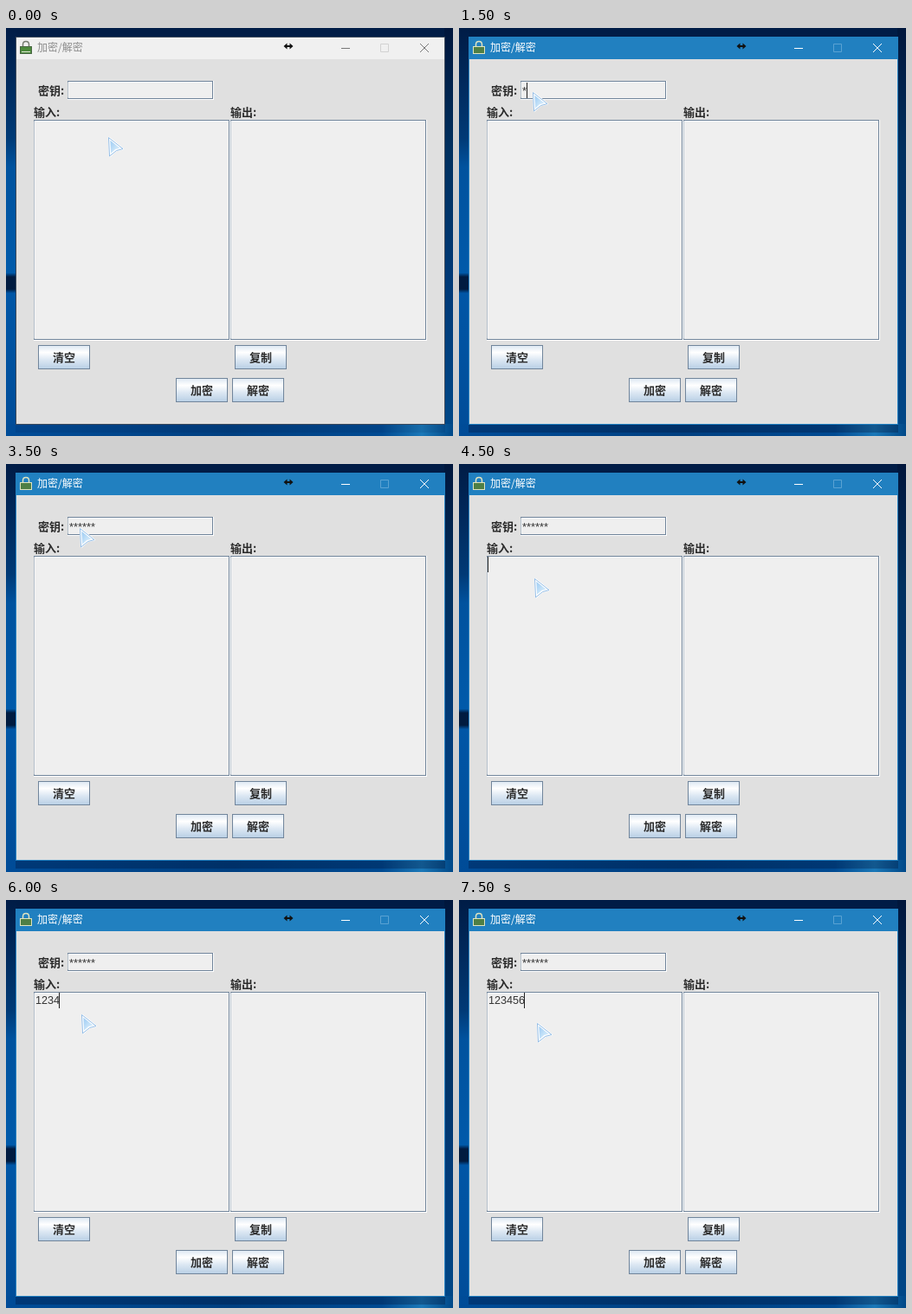
These frames come from a looping animation (516x471 px, 8 s). An HTML page:

```html
<!DOCTYPE html>
<html lang="zh">
<head>
<meta charset="utf-8">
<style>
html, body { margin: 0; width: 516px; height: 471px; overflow: hidden; }
svg { display: block; }
text { font: 12px "Noto Sans CJK SC", "Noto Sans CJK", sans-serif; white-space: pre; }
.label { font-size: 13px; font-weight: bold; fill: #2b2b2b; }
.typed { font: 12.6px "Liberation Sans", Arial, sans-serif; fill: #333; }
.line { fill: none; stroke-width: 1; }
</style>
</head>
<body>
<svg width="516" height="471" viewBox="0 0 516 471">
  <defs>
    <linearGradient id="left" x2="0" y2="1">
      <stop offset="0" stop-color="#001c46"/>
      <stop offset=".12" stop-color="#00285a"/>
      <stop offset=".27" stop-color="#003a76"/>
      <stop offset=".34" stop-color="#00529e"/>
      <stop offset=".6" stop-color="#005aaa"/>
      <stop offset=".61" stop-color="#001b40"/>
      <stop offset=".64" stop-color="#001b40"/>
      <stop offset=".65" stop-color="#0056a6"/>
      <stop offset="1" stop-color="#004c98"/>
    </linearGradient>
    <linearGradient id="right" x2="0" y2="1">
      <stop offset="0" stop-color="#00163c"/>
      <stop offset=".3" stop-color="#00305f"/>
      <stop offset=".65" stop-color="#003a78"/>
      <stop offset="1" stop-color="#004888"/>
    </linearGradient>
    <linearGradient id="floor">
      <stop offset="0" stop-color="#004c98"/>
      <stop offset=".5" stop-color="#003f80"/>
      <stop offset=".84" stop-color="#004a92"/>
      <stop offset=".93" stop-color="#1a78b8"/>
      <stop offset="1" stop-color="#004888"/>
    </linearGradient>
    <linearGradient id="metal" x2="0" y2="1">
      <stop offset="0" stop-color="#dde8f3"/>
      <stop offset=".3" stop-color="#fff"/>
      <stop offset=".6" stop-color="#dde8f3"/>
      <stop offset="1" stop-color="#b8cfe5"/>
    </linearGradient>
    <linearGradient id="ice" x2="1" y2="1">
      <stop offset="0" stop-color="#8fc4f2"/>
      <stop offset=".5" stop-color="#c5e2f8"/>
      <stop offset="1" stop-color="#eef8ff"/>
    </linearGradient>
  </defs>

  <rect width="516" height="471" fill="#001c46"/>
  <rect width="12" height="471" fill="url(#left)"/>
  <rect x="506" width="10" height="471" fill="url(#right)"/>
  <rect y="457" width="516" height="14" fill="url(#floor)"/>
  <rect id="shadow" x="11" y="458" width="496" height="9" fill="#001030" opacity=".3"/>

  <rect id="frame" x="11" y="10" width="496" height="448"/>
  <rect id="bar" x="12" y="11" width="494" height="25"/>
  <rect x="12" y="36" width="494" height="421" fill="#e0e0e0"/>

  <path id="shackle" class="line" d="M19.5 22V19Q19.5 15.5 23 15.5T26.5 19V22" style="stroke-width:1.5"/>
  <rect id="lock" x="16.5" y="21.5" width="13" height="8"/>
  <path id="stripe" class="line" d="M18 27.5H28" stroke="#dfe8d5"/>
  <text id="title" x="36" y="27">加密/解密</text>
  <path d="M320.500 21l4-3.500v2.500h3v-2.500l4 3.500-4 3.500v-2.500h-3v2.500z" fill="#111"/>
  <path id="max" class="line" d="M432.500 18.500h9v9h-9z"/>
  <path id="marks" class="line" d="M387 23.500h10M478 18l10 10m0-10l-10 10"/>

  <g id="form"></g>
  <text id="key" class="typed" x="73" y="77" style="font-size:12.85px"></text>
  <text id="input" class="typed" x="34" y="120"></text>
  <rect id="caret" width="1" height="18" fill="#222"/>
  <g id="mouse">
    <path d="M1 1L16.500 13.500L9 15L2 21.500Z" fill="url(#ice)" stroke="#fff" stroke-width="2.500" stroke-linejoin="round"/>
    <path d="M.5 .5L17 13.500L9.500 15.500L1.500 22Z" fill="none" stroke="#86b5e2" stroke-width=".9" stroke-linejoin="round"/>
  </g>
</svg>
<script>
const $ = id => document.getElementById(id);
const paint = (id, attrs) => {
  for (const name in attrs) $(id).setAttribute(name, attrs[name]);
};

const label = (x, y, text) => `<text class="label" x="${x}" y="${y}">${text}</text>`;
const box = (x, y, w, h) => `
  <rect x="${x}" y="${y}" width="${w + 1}" height="${h + 1}" fill="#fff"/>
  <rect x="${x + .5}" y="${y + .5}" width="${w - 1}" height="${h - 1}" fill="#efefef" stroke="#71859b"/>
  <path class="line" d="M${x + 1} ${y + h - 1.5}V${y + 1.5}H${x + w - 1}" stroke="#fafafa"/>`;
const button = (x, y, text) => `
  <rect x="${x + .5}" y="${y + .5}" width="59" height="27" fill="url(#metal)" stroke="#71859b"/>
  ${label(x + 17, y + 19, text)}`;

$("form").innerHTML =
  label(37, 77, "密钥:") + label(32, 102, "输入:") + label(259, 102, "输出:") +
  box(71, 61, 168, 21) + box(32, 106, 226, 254) + box(259, 106, 226, 254) +
  button(37, 366, "清空") + button(264, 366, "复制") +
  button(196, 404, "加密") + button(261, 404, "解密");

const STEP = 500, LOOP = 8000;
// The last entry not later than the step applies.
const at = (list, step) => list.filter(e => e[0] <= step).pop();
const mouse = [[0, 118, 126], [1, 85, 74], [8, 90, 118], [9, 87, 132], [15, 90, 142]];
const stars = [[0, 0], [3, 1], [4, 2], [5, 4], [6, 6]];
const digits = [[0, 0], [11, 2], [12, 4], [13, 6]];
const caretOff = [0, 2, 7, 10, 14];

function draw(step) {
  const active = step > 0;
  const [, mx, my] = at(mouse, step);
  const nStars = at(stars, step)[1], nDigits = at(digits, step)[1];
  const inKey = step < 9;

  paint("shadow", { opacity: active ? .3 : .1 });
  paint("frame", { fill: active ? "#2180c0" : "#3c4a5c" });
  paint("bar", { fill: active ? "#2180c0" : "#f0f0f0" });
  paint("title", { fill: active ? "#fff" : "#8c8c8c" });
  paint("marks", { stroke: active ? "#fff" : "#777" });
  paint("max", { stroke: active ? "#5aa2d3" : "#d2d2d2" });
  paint("shackle", { stroke: active ? "#dfe3c0" : "#777d72" });
  paint("lock", { fill: active ? "#4f7f45" : "#4c8a3c", stroke: active ? "#dfe3c0" : "#4a6845" });
  paint("stripe", { opacity: active ? 0 : 1 });

  $("key").textContent = "*".repeat(nStars);
  $("input").textContent = "123456".slice(0, nDigits);
  paint("caret", {
    x: inKey ? 73 + 5 * nStars : 33 + 7 * nDigits,
    y: inKey ? 63 : 107,
    opacity: caretOff.includes(step) ? 0 : 1
  });
  paint("mouse", { transform: `translate(${mx} ${my})` });
}

const start = performance.now();
let shown = -1;
function tick() {
  const step = Math.floor((performance.now() - start) % LOOP / STEP);
  if (step !== shown) draw(shown = step);
  requestAnimationFrame(tick);
}
tick();
</script>
</body>
</html>
```
